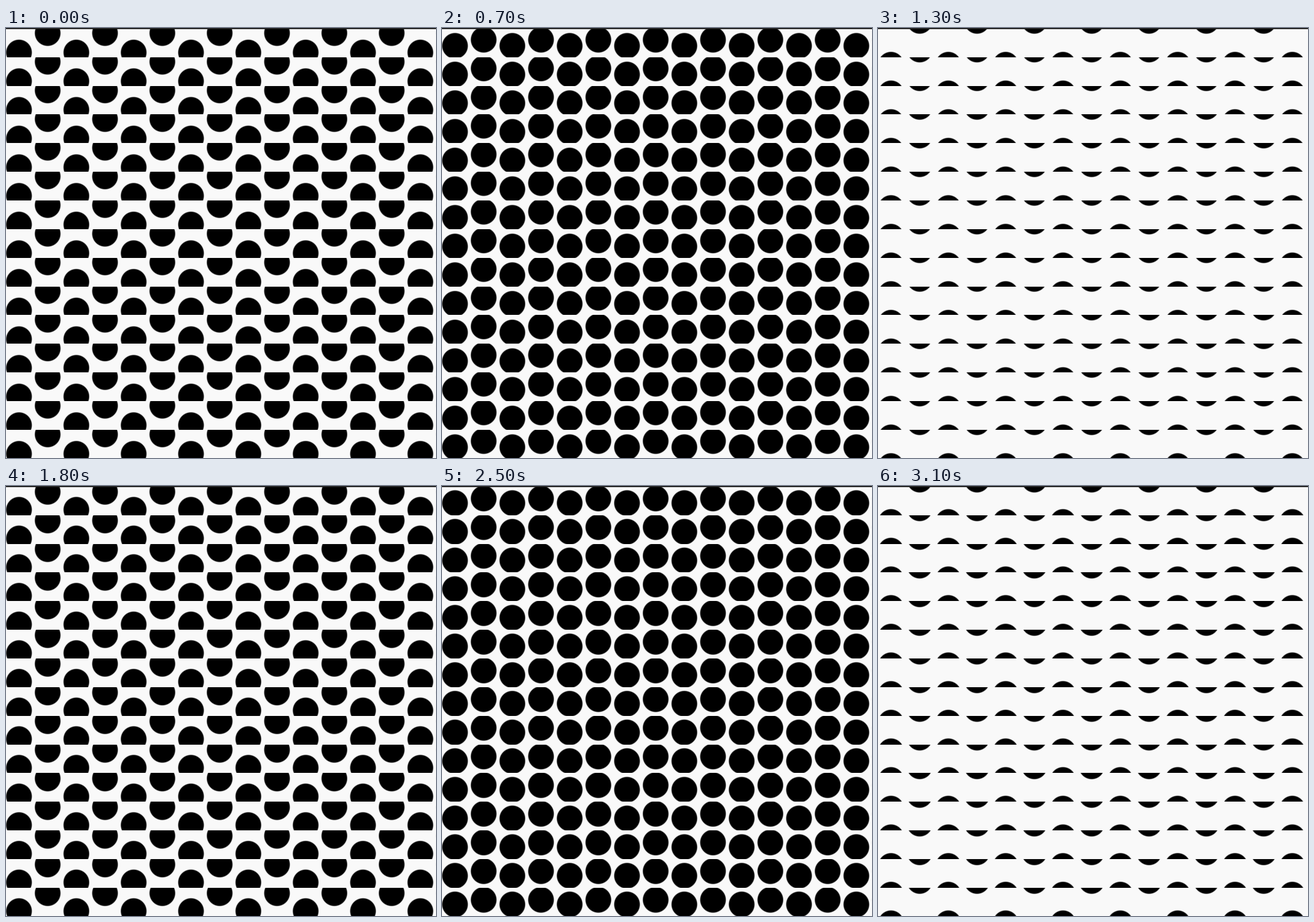
Write an HTML page with a canvas that moves like this. It is 748 by 748 pixels and loops after 3200 ms.

```html
<!DOCTYPE html>
<html lang="en">
<head>
<meta charset="utf-8">
<title>Sliding dots</title>
<style>
  html, body { margin: 0; width: 100%; height: 100%; overflow: hidden; background: #f9f9f9; }
  canvas { display: block; }
</style>
</head>
<body>
<canvas id="stage" width="748" height="748"></canvas>
<script>
const ctx = document.getElementById('stage').getContext('2d');
const SIZE = 748, COUNT = 15, PITCH = SIZE / COUNT;
const LEFT = -2.3, TOP = 0.8;
const LOOP = 3200, STEP = 100, PERIOD = 912, PHASE = 0.339;
const PAPER = 249;

// Soft edge: smoothstep over the squared distance from the centre.
const EDGE_IN = 0.72, EDGE_OUT = 0.88, STOPS = 8;
const radiusOf = edge => Math.sqrt(edge) * PITCH / 2;
const R_OUT = radiusOf(EDGE_OUT);

function dotFill(x, y) {
  const fill = ctx.createRadialGradient(x, y, 0, x, y, R_OUT);
  for (let i = 0; i <= STOPS; i++) {
    const k = i / STOPS;
    const level = Math.round(PAPER * k * k * (3 - 2 * k));
    const radius = radiusOf(EDGE_IN + (EDGE_OUT - EDGE_IN) * k);
    fill.addColorStop(Math.min(1, radius / R_OUT), `rgb(${level},${level},${level})`);
  }
  return fill;
}

function draw(time) {
  const shift = (time / PERIOD + PHASE) % 1 * PITCH;
  ctx.fillStyle = '#f9f9f9';
  ctx.fillRect(0, 0, SIZE, SIZE);

  for (let row = 0; row < COUNT; row++) {
    const y0 = Math.round(TOP + row * PITCH);
    const y1 = Math.round(TOP + (row + 1) * PITCH);
    for (let col = 0; col <= COUNT; col++) {
      const x0 = Math.round(LEFT + col * PITCH);
      const x1 = Math.round(LEFT + (col + 1) * PITCH);
      const cx = LEFT + (col + 0.5) * PITCH;
      const cy = TOP + (row + 0.5) * PITCH + (col % 2 ? -shift : shift);
      ctx.fillStyle = dotFill(cx, cy);
      ctx.fillRect(x0, y0, x1 - x0, y1 - y0);
    }
  }

  ctx.fillStyle = '#222';
  ctx.fillRect(0, 0, SIZE, 2);
}

function tick(now) {
  draw(Math.floor(now % LOOP / STEP) * STEP);
  requestAnimationFrame(tick);
}
draw(0);
requestAnimationFrame(tick);
</script>
</body>
</html>
```
